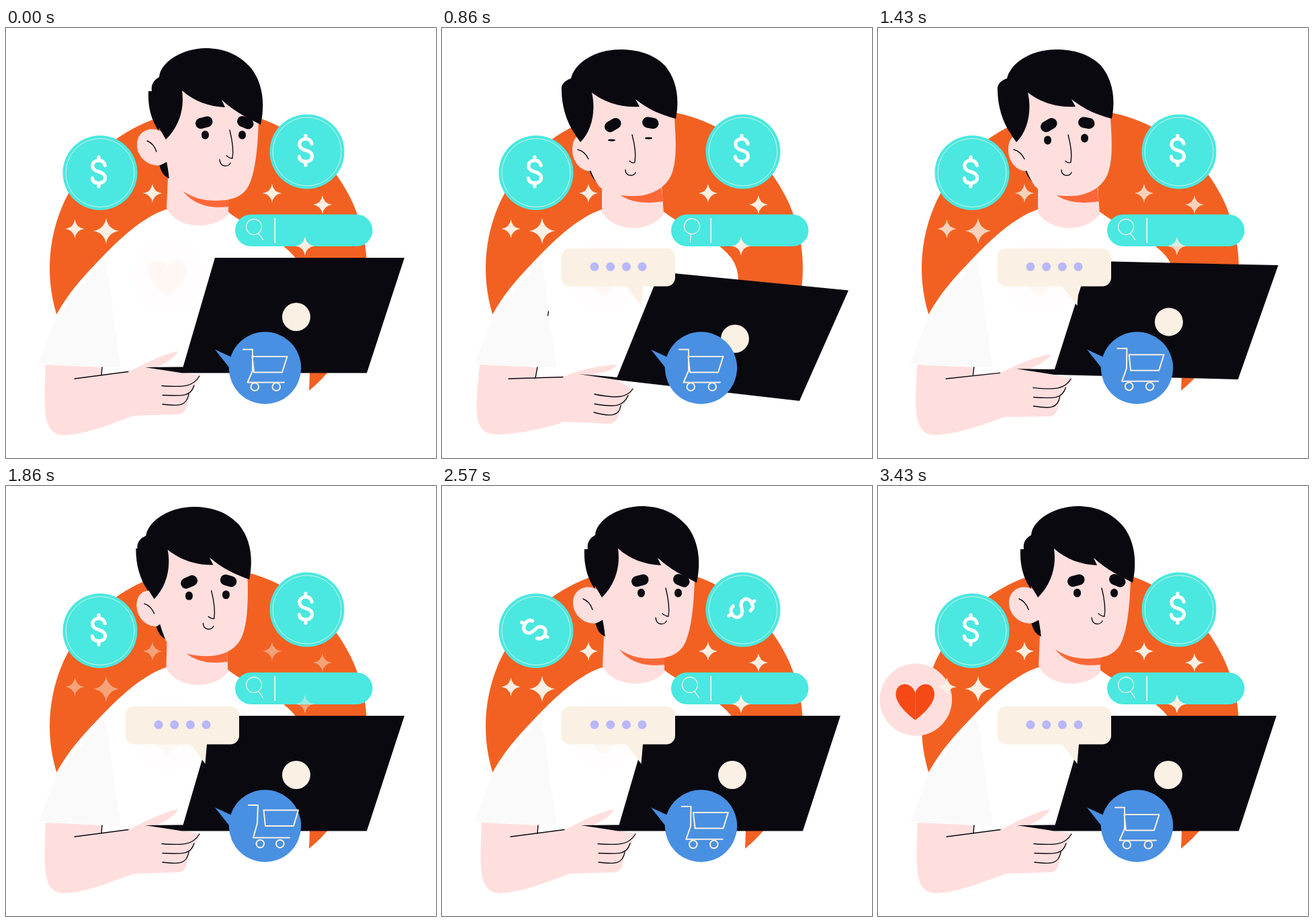
Write an HTML page that moves like this. It is 640 px wide and 640 px high and loops after 4.78 s.

```html
<!DOCTYPE html>
<html lang="en">
<head>
<meta charset="utf-8">
<title>Online shopping</title>
<style>
html, body { margin: 0; width: 100%; height: 100%; overflow: hidden; background: #fff; }
svg { display: block; width: 100vw; height: 100vh; }
.ink { fill: #0a0910; }
.skin { fill: #ffdfde; }
.cream { fill: #faf0e3; }
.teal { fill: #4ae8e0; }
.line { fill: none; stroke: #0a0910; stroke-width: 1.4; stroke-linecap: round; stroke-linejoin: round; }
.thin { fill: none; stroke: #faf0e3; stroke-width: 1.3; }
.brow { stroke: #0a0910; stroke-width: 16; stroke-linecap: round; }
.eye { stroke: #0a0910; stroke-width: 10.8; stroke-linecap: round; transform-box: fill-box; transform-origin: center; }
.dollar { fill: none; stroke: #fff; stroke-width: 5.2; stroke-linecap: round; }
#cart { fill: none; stroke: #faf0e3; stroke-width: 2; stroke-linejoin: round; stroke-linecap: round; }
</style>
</head>
<body>
<svg viewBox="0 0 640 640">
  <defs>
    <path id="star" d="M0-14Q1.8-1.8 14 0Q1.8 1.8 0 14Q-1.8 1.8-14 0Q-1.8-1.8 0-14Z"/>
    <path id="sign" d="M9.2-9.5C8-14.5 4.5-16.8 0-16.8C-5.5-16.8-9.2-13.5-9.2-9C-9.2-3-4.5-1.3 0 0C5.5 1.4 9.6 3.5 9.6 9C9.6 14 5.5 16.8 0 16.8C-5.5 16.8-9.2 14.5-9.6 9.5M0-22V-17M0 17V22"/>
  </defs>

  <circle cx="301" cy="357.500" r="236" fill="#f26122"/>
  <path fill="#fff" d="M238 270C203 282 170 313 143 341C111 374 92 396 75 427L48 500L130 505L110 620H451V540C453 500 455 420 441 375C440 352 432 340 411 323C390 306 350 290 331 274Z"/>
  <path fill="#fafafa" d="M147 345L76 427L48 500L171 505C166 470 158 425 155 385Z"/>
  <path id="crease" class="line" d="M158.500 422L157.500 428"/>

  <g data-pose="head">
    <path class="skin" d="M242 200L239 268C255 301 310 301 331 277L331 240Z"
      data-b="M238 235L238 275C258 305 310 305 330 277L327 235Z"/>
    <path fill="#fc6838" d="M262 241C282 268 312 268 331 266L331 240Z"
      data-b="M266 249C285 262 310 261 329 258L326 235Z"/>
    <g id="head">
      <path class="ink" d="M227 200L240 198L243 224Q230 219 228 200Z"
        data-b="M217 205L226 210L232 231Q222 224 217 205Z"/>
      <path class="skin" d="M240 166C236 145 195 143 195 174C195 192 212 207 230 204L246 196Z"
        data-b="M216 168C210 155 194 158 194 181C194 198 205 212 220 213L234 200Z"/>
      <path class="skin" d="M236 155L262 92L326 112L376 140C375 165 373 205 364 228C356 252 335 257 312 257C285 257 262 247 243 224C241 205 236 190 236 165Z"
        data-b="M208 160L223 95L294 112L346 133C348 165 350 195 342 217C334 238 310 250 288 250C262 250 245 246 234 236C224 222 217 205 212 178Z"/>
      <path class="line" d="M210 168Q220 172 224 184" data-b="M202 181Q212 183 218 195"/>
      <path class="brow" d="M290 142L299.500 139.500" data-b="M250 147L258.500 142"/>
      <path class="brow" d="M352 139L360.500 142.500" data-b="M306 140.500L314.500 142"/>
      <path class="eye" d="M296.500 158.200L296.500 160.200" data-b="M252.500 166L252.500 168"/>
      <path class="eye" d="M351.500 158.200L351.500 160.200" data-b="M307.500 163L307.500 165"/>
      <path class="line" d="M333 152C337 168 339 182 337 194Q333 194 328 190"
        data-b="M283 159C287 174 289 188 287 200Q284 202 279 198"/>
      <path class="line" d="M318 196C319 208 331 207 334 201" data-b="M273 211C273 222 287 221 288 215"/>
      <path class="ink" d="M212 94C211 115 215 135 227 153L228 149L238 166C257 147 266 122 262 93C280 109 302 117 326 118L321 107C342 126 362 135 379 144C386 112 382 82 365 60C346 38 322 30 297 30C258 31 229 53 228 73C217 79 216 88 217 94Z"
        data-b="M178 92C178 115 185 140 198 158L199 160L206 170C224 152 229 122 223 96C242 111 268 119 294 117L288 106C308 122 328 130 348 135C354 104 349 77 332 56C314 38 290 32 265 32C226 32 197 53 192 75C180 79 177 87 178 92Z"/>
    </g>
  </g>

  <g data-pose="desk">
    <path class="skin" d="M59 501L143 505L142 517L182 512Q235 484 256 481Q252 492 225 505L262 513L288 517Q284 530 280 533Q277 545 271 548Q270 575 257 575L190 577C155 590 115 606 85 606C52 604 57 560 59 501Z"
      data-b="M56 501L142 505L139 520L180 519Q220 503 261 501Q254 512 225 515L260 524L284 537Q280 548 276 550Q272 562 266 564Q262 590 248 589L182 586C155 596 110 605 80 605C42 604 51 560 56 501Z"/>
    <path class="line" d="M102 522L182 511.500M143 505L142 517" data-b="M99 522L180 519.500M142 505L139 521"/>
    <path class="line" d="M232 532.500C265 535 278 534 288 518" data-b="M227 545C260 552 276 550 284 537"/>
    <path class="line" d="M233 546.500C265 548 275 548 280 532" data-b="M227 559.500C258 565 270 563 277 547"/>
    <path class="line" d="M233 560C257 563 269 563 272 545" data-b="M226 572C250 579 264 578 266 562"/>
    <path class="ink" d="M311 342L593 342L537 513.500L262 513.500L207 505L263.500 504.500Z"
      data-b="M324 363L605 390.500L532 555L262 524L203 515L260.500 520Z"/>
    <path class="cream" d="M411 430a21 21 0 1 0 42 0a21 21 0 1 0 -42 0"
      data-b="M415 462.500a21 21 0 1 0 42 0a21 21 0 1 0 -42 0"/>
  </g>

  <rect class="teal" x="341" y="277.500" width="204.500" height="47.500" rx="23.750"/>
  <path class="thin" d="M400.300 283V320" style="stroke-width:1.800"/>
  <g id="lens" class="thin">
    <circle cx="369" cy="296" r="11.500"/>
    <path d="M375.500 305.500L383 315.500"/>
  </g>

  <g transform="translate(140 215.500)">
    <circle class="teal" r="55.500"/><circle class="thin" r="51" style="stroke-width:.8"/>
    <use id="coinL" class="dollar" href="#sign"/>
  </g>
  <g transform="translate(448 184)">
    <circle class="teal" r="55.500"/><circle class="thin" r="51" style="stroke-width:.8"/>
    <use id="coinR" class="dollar" href="#sign"/>
  </g>

  <g fill="#4990e2">
    <circle cx="385.500" cy="506" r="53.700"/>
    <path d="M311 478.500L338 491L332 505Z"/>
  </g>
  <g id="cart" data-pose="cart">
    <path d="M353 478.500L367 478.500L367 510L359.500 527.500L414 527.500" data-b="M361 475L375 475L374 502L368 523.500L422 523.500"/>
    <path d="M366.500 489L418.500 489L411 512.500L369 512.500Z" data-b="M383.500 482.500L435 482.500L428 506L386 506Z"/>
    <path d="M364.500 534a5.800 5.800 0 1 0 11.600 0a5.800 5.800 0 1 0 -11.600 0" data-b="M372.500 532.500a5.800 5.800 0 1 0 11.600 0a5.800 5.800 0 1 0 -11.600 0"/>
    <path d="M396.500 534a5.800 5.800 0 1 0 11.600 0a5.800 5.800 0 1 0 -11.600 0" data-b="M402 532.500a5.800 5.800 0 1 0 11.600 0a5.800 5.800 0 1 0 -11.600 0"/>
  </g>

  <g id="like">
    <circle class="skin" cx="56.300" cy="318" r="53.800"/>
    <path fill="#f54a16" d="M55.500 348.500C40 337 26.500 322 26.500 310C26.500 291 50 290 55.500 308C61 290 84 291 84 310C84 322 71 337 55.500 348.500Z"/>
    <path d="M55.500 308V348" stroke="#fb7448" stroke-width=".6"/>
  </g>

  <g id="chat">
    <rect class="cream" x="177.500" y="328" width="169.500" height="56.500" rx="13"/>
    <path class="cream" d="M274 384L296.500 413.500L299 384Z"/>
    <g fill="#b9b8f8">
      <circle cx="227" cy="355.300" r="6.500"/><circle cx="250.700" cy="355.300" r="6.500"/>
      <circle cx="274.400" cy="355.300" r="6.500"/><circle cx="298" cy="355.300" r="6.500"/>
    </g>
  </g>

  <g id="stars" class="cream">
    <use href="#star" x="218" y="246"/><use href="#star" x="396" y="246"/>
    <use href="#star" x="102.500" y="299"/><use href="#star" x="471" y="263"/>
    <use href="#star" x="445" y="324.500"/>
    <use href="#star" transform="translate(149 302) scale(1.400)"/>
  </g>
</svg>
<script>
const LOOP = 4780, STEP = 500 / 7, LAST = 48, BEAT = 12 * STEP;
const $ = id => document.getElementById(id);
const NUM = /-?[\d.]+/g;
const linear = u => u;
const smooth = u => (1 - Math.cos(Math.PI * u)) / 2;

// Value of a keyframe list [[time, value], ...] at time t
function track(t, keys, ease = linear) {
  if (t <= keys[0][0]) return keys[0][1];
  for (let i = 1; i < keys.length; i++) {
    const [t0, v0] = keys[i - 1], [t1, v1] = keys[i];
    if (t <= t1) return v0 + (v1 - v0) * ease((t - t0) / (t1 - t0));
  }
  return keys[keys.length - 1][1];
}

const morphs = [...document.querySelectorAll('[data-b]')].map(el => {
  const d = el.getAttribute('d');
  return {
    el, d,
    pose: el.closest('[data-pose]').dataset.pose,
    a: d.match(NUM).map(Number),
    b: el.dataset.b.match(NUM).map(Number)
  };
});

const eyes = document.querySelectorAll('.eye');
const turn = (id, deg, x, y) => $(id).setAttribute('transform', `rotate(${deg} ${x} ${y})`);

function draw(t) {
  const pose = {
    head: track(t, [[71, 0], [500, .15], [857, 1], [1680, 1], [2071, 0]]),
    desk: track(t, [[352, 0], [857, 1], [1695, 0]], smooth),
    cart: track(t % 1137, [[130, 0], [490, 1], [725, 1], [850, 0]], smooth)
  };
  for (const m of morphs) {
    let i = 0;
    // Arc flags must stay bare integers, so trailing zeros are dropped
    m.el.setAttribute('d', m.d.replace(NUM, () => {
      const v = m.a[i] + (m.b[i] - m.a[i]) * pose[m.pose];
      i++;
      return +v.toFixed(2);
    }));
  }

  turn('head', track(t, [[71, 0], [500, -5.7], [857, 0]]), 324, 280);
  const lid = track(t, [[714, 1], [800, .22], [930, .22], [1071, 1]]);
  eyes.forEach(e => e.style.transform = `scaleY(${lid})`);
  $('crease').style.opacity = track(pose.desk, [[.5, 0], [1, 1]]);

  turn('lens', track(t, [[71, 0], [500, -43], [857, 42], [1290, 0]]), 371.5, 299.5);

  const spin = track(t, [[2214, 0], [2750, 360]]);
  $('coinL').setAttribute('transform', `translate(-2 -1.5) rotate(${-spin})`);
  $('coinR').setAttribute('transform', `translate(-2 -2) rotate(${spin})`);

  const phase = (t + 1) % BEAT / BEAT;
  $('stars').style.opacity = track(phase, [[0, 1], [.17, .45], [.57, .47], [.73, 1]]);

  $('chat').style.opacity = track(t, [[571, 0], [857, 1]]);
  const slide = track(t, [[2857, 0], [3428, 1]]);
  $('like').style.opacity = .04 + .96 * slide;
  $('like').setAttribute('transform', `translate(${185 * (1 - slide)} ${51 * (1 - slide)})`);
}

const start = performance.now();
function tick() {
  const t = (performance.now() - start) % LOOP;
  draw(Math.min(LAST, Math.floor((t + 3) / STEP)) * STEP);
  requestAnimationFrame(tick);
}
tick();
</script>
</body>
</html>
```
